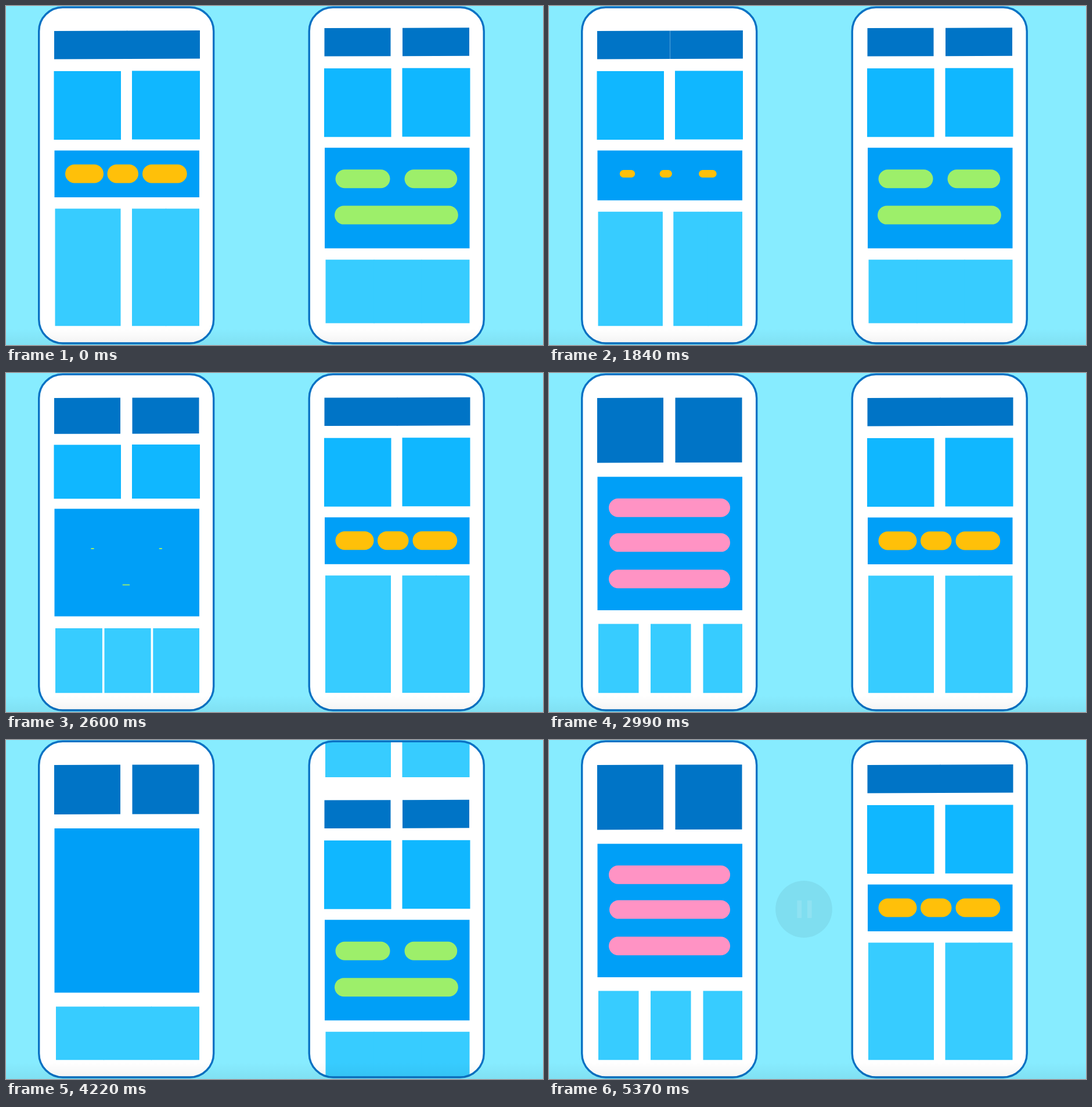
Recreate the animation shown at these times as an HTML page with a canvas. Size 925 by 583 pixels, loop 7.01 s.

```html
<!DOCTYPE html>
<html lang="en">
<head>
<meta charset="utf-8">
<title>Adaptive layouts</title>
<style>
  html, body { margin: 0; width: 100%; height: 100%; overflow: hidden; background: #87ecff; }
  canvas { display: block; width: 100%; height: 100%; }
</style>
</head>
<body>
<canvas id="stage" width="925" height="583"></canvas>
<script>
const ctx = document.getElementById('stage').getContext('2d');
const LOOP = 7010;
const RIGHT_X = 465.5;   // distance between the two phones
const PAGE = 547;        // height of one page in the scrolling phone
const REST = -4.8;       // where the second page settles
const COLOR = {
  sky: '#87ecff', line: '#0a72c4', head: '#0074c6', square: '#10b7ff',
  block: '#009ff7', foot: '#37ccff',
  orange: '#ffc009', green: '#9def6a', pink: '#ff93c4'
};

// Every layout has the same cells, so any two can be blended.
// Cells are [left, top, right, bottom]; pills are [left, top, right].
function layout({ headX, headY, squares, block, footX, footY, tint, pills }) {
  const row = (xs, top, bottom) => xs.map(([a, b]) => [a, top, b, bottom]);
  return {
    head: row(headX, 42.5, headY),
    square: squares
      ? [[82.5, 112, 198, 230], [217, 111.5, 334, 229.5]]
      : [[82.5, 166, 198, 166], [217, 166, 334, 166]],
    block: [[83.5, block[0], 333, block[1]]],
    foot: row(footX, footY, 550.3),
    tint, pills
  };
}

const whole = [[83, 209], [208, 334]];
const halves = [[83, 197], [217.5, 332.5]];
const wide = x => [[x, 169], [168, 251], [250, 333]];

const orange = layout({
  headX: whole, headY: 91, squares: true, block: [248.5, 329],
  footX: [[84.5, 197.5], [217, 276], [275, 333]], footY: 348.5,
  tint: COLOR.orange,
  pills: [[102, 272.5, 168], [174.5, 272.5, 228], [235, 272.5, 311.7]]
});
const green = layout({
  headX: halves, headY: 91, squares: true, block: [248.5, 421.5],
  footX: wide(85), footY: 441,
  tint: COLOR.green,
  pills: [[102, 286, 196], [221, 286, 311.7], [100.5, 348.4, 313.3]]
});
const pink = layout({
  headX: halves, headY: 154, squares: false, block: [178.5, 408],
  footX: [[85, 154.5], [175, 244.5], [265.5, 333]], footY: 431.5,
  tint: COLOR.pink,
  pills: [[103, 215.8, 312], [104, 275.6, 312], [103, 338.2, 312]]
});
const plain = layout({
  headX: halves, headY: 127.5, squares: false, block: [152, 434.5],
  footX: wide(86), footY: 458.5, tint: COLOR.block, pills: []
});

const morphs = [
  [1740, 2130, orange, green],
  [2330, 2850, green, pink],
  [3600, 4130, pink, plain],
  [4330, 4860, plain, pink]
];
const scrolls = [
  [1988, 2556, REST, PAGE],
  [2999, 3499, PAGE, REST],
  [4041, 4609, REST, PAGE]
];

const clamp = x => Math.min(1, Math.max(0, x));
const mix = (a, b, p) => a + (b - a) * p;
const ease = p => p < .5 ? 4 * p ** 3 : 1 - 4 * (1 - p) ** 3;

// The latest segment that has begun, or the first, with its progress.
function segment(list, t) {
  const s = list.filter(([start]) => t >= start).pop() || list[0];
  return [s[2], s[3], clamp((t - s[0]) / (s[1] - s[0]))];
}

function snap(t) {
  if (t < 1370) return 0;
  if (t < 1680) return 1370 + 80 * Math.min(2, Math.floor((t - 1370) / 80));
  if (t >= 5370) return 5370;
  const step = 3690 / 48;
  return 1680 + step * Math.floor((t - 1680) / step);
}

function cell([l, t, r, b], slope = 0) {
  if (b - t < .1) return;
  const rise = x => (x - 208) * slope;
  ctx.beginPath();
  ctx.moveTo(l, t - rise(l));
  ctx.lineTo(r, t - rise(r));
  ctx.lineTo(r, b - rise(r));
  ctx.lineTo(l, b - rise(l));
  ctx.fill();
}

function drawPills({ pills, tint }, scale) {
  if (scale <= 0) return;
  ctx.fillStyle = tint;
  for (const [l, t, r] of pills) {
    const w = (r - l) * scale, h = 32 * scale;
    ctx.beginPath();
    ctx.roundRect((l + r - w) / 2, t + 16 - h / 2, w, h, h / 2);
    ctx.fill();
  }
}

function drawLayout(from, to = from, p = 0) {
  const e = ease(p);
  for (const part of ['head', 'square', 'block', 'foot']) {
    ctx.fillStyle = COLOR[part];
    from[part].forEach((box, i) =>
      cell(box.map((v, k) => mix(v, to[part][i][k], e)), part === 'head' ? .003 : 0));
  }
  drawPills(from, clamp(1 - p / .4));
  drawPills(to, clamp((p - .6) / .4));
}

function phone(x, content) {
  ctx.save();
  ctx.translate(x, 0);
  const body = new Path2D();
  body.roundRect(56.7, 2.3, 301, 577.7, 41);
  ctx.fillStyle = '#fff';
  ctx.fill(body);
  ctx.save();
  ctx.clip(body);
  content();
  ctx.restore();
  ctx.strokeStyle = COLOR.line;
  ctx.lineWidth = 3.4;
  ctx.stroke(body);
  ctx.restore();
}

function page(y, design) {
  ctx.save();
  ctx.translate(0, y);
  drawLayout(design);
  ctx.restore();
}

// Player badge: grows to double size while it fades out.
function badge(p, icon) {
  if (p < 0 || p >= 1) return;
  ctx.save();
  ctx.translate(439, 291);
  ctx.scale(1 + p, 1 + p);
  ctx.globalAlpha = (1 - p) * .5;
  ctx.fillStyle = '#000';
  ctx.beginPath();
  ctx.arc(0, 0, 26, 0, 2 * Math.PI);
  ctx.fill();
  ctx.globalAlpha = 1 - p;
  ctx.fillStyle = '#fff';
  icon();
  ctx.restore();
}

function playIcon() {
  ctx.beginPath();
  ctx.moveTo(-6.3, -8.3);
  ctx.lineTo(7.2, 0);
  ctx.lineTo(-6.3, 8.3);
  ctx.fill();
}

function pauseIcon() {
  ctx.fillRect(-6.2, -8, 4.2, 16);
  ctx.fillRect(3.1, -8, 4.2, 16);
}

const shade = ctx.createLinearGradient(0, 555, 0, 583);
shade.addColorStop(0, 'rgba(0,0,0,0)');
shade.addColorStop(1, 'rgba(0,0,0,.05)');

function draw(now) {
  const t = snap(now % LOOP);
  ctx.fillStyle = COLOR.sky;
  ctx.fillRect(0, 0, 925, 583);

  phone(0, () => drawLayout(...segment(morphs, t)));

  const [a, b, p] = segment(scrolls, t);
  const y = mix(a, b, ease(p));
  phone(RIGHT_X, () => {
    page(y - PAGE, orange);
    page(y, green);
  });

  ctx.fillStyle = shade;
  ctx.fillRect(0, 555, 925, 28);

  if (t >= 1370) badge(.096 + (t - 1370) / 500, playIcon);
  badge(.88 + (t - 5370) / 500, pauseIcon);
}

const begin = performance.now();
function tick() {
  draw(performance.now() - begin);
  requestAnimationFrame(tick);
}
tick();
</script>
</body>
</html>
```
